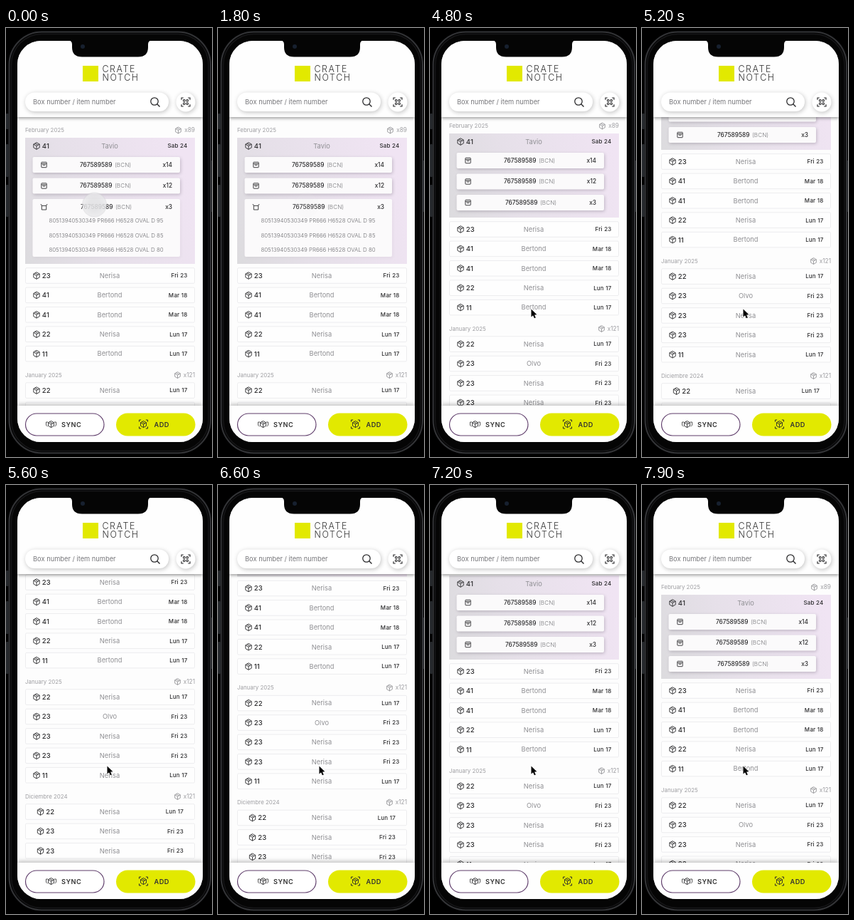
Recreate the animation shown at these times as an HTML page with a canvas. Size 290x602 px, loop 8 s.

```html
<!DOCTYPE html>
<html lang="en">
<head>
<meta charset="utf-8">
<title>Box list</title>
<style>
  html, body { margin: 0; width: 100%; height: 100%; overflow: hidden; background: #000; }
  canvas { display: block; width: 290px; height: 602px; }
</style>
</head>
<body>
<canvas id="stage"></canvas>
<script>
const W = 290, H = 602, LOOP = 8000, STEP = 100;
const canvas = document.getElementById('stage');
const dpr = window.devicePixelRatio || 1;
canvas.width = W * dpr;
canvas.height = H * dpr;
const c = canvas.getContext('2d');

const INK = '#2b2b2d', GREY = '#8f8f93', LIME = '#e2e900', PLUM = '#5f3d6b';
const SCREEN = { x: 16, y: 18, w: 261, h: 563, r: 33 };
const ROW_GAP = 27.4, FOLD = 59;

const months = [
  { y: 143.5, name: 'February 2025', total: 'x89', iconX: 242.5, first: 288.5, inset: 0, rows: [
    ['23', 'Nerisa', 'Fri 23'], ['41', 'Bertond', 'Mar 18'], ['41', 'Bertond', 'Mar 18'],
    ['22', 'Nerisa', 'Lun 17'], ['11', 'Bertond', 'Lun 17']] },
  { y: 428, name: 'January 2025', total: 'x121', iconX: 241.5, first: 449.6, inset: 0, rows: [
    ['22', 'Nerisa', 'Lun 17'], ['23', 'Olvo', 'Fri 23'], ['23', 'Nerisa', 'Fri 23'],
    ['23', 'Nerisa', 'Fri 23'], ['11', 'Nerisa', 'Lun 17']] },
  { y: 589, name: 'Diciembre 2024', total: 'x121', iconX: 241.5, first: 610.5, inset: 5.5, rows: [
    ['22', 'Nerisa', 'Lun 17'], ['23', 'Nerisa', 'Fri 23'], ['23', 'Nerisa', 'Fri 23']] }
];

const scrollKeys = [[4700, 0], [4800, 6], [5000, 50], [5200, 101], [5400, 137], [5600, 152],
  [6300, 152], [6400, 151], [6600, 143.5], [6800, 108], [7000, 66], [7200, 27], [7400, 5], [7500, 0]];
const foldKeys = [[3600, 1], [3700, 0.55], [3800, 0.15], [3900, 0]];
const touchKeys = [[600, 1], [1000, 0.12], [3600, 0.12], [3900, 0]];

function track(keys, t) {
  if (t <= keys[0][0]) return keys[0][1];
  for (let i = 1; i < keys.length; i++) {
    const [t0, v0] = keys[i - 1], [t1, v1] = keys[i];
    if (t <= t1) return v0 + (v1 - v0) * (t - t0) / (t1 - t0);
  }
  return keys[keys.length - 1][1];
}

function text(str, x, y, size, weight, color, align = 'left', spacing = 0) {
  c.font = `${weight} ${size}px Inter, sans-serif`;
  c.letterSpacing = spacing + 'px';
  c.textAlign = align;
  c.fillStyle = color;
  c.fillText(str, x, y + size * 0.36);
}

function box(x, y, w, h, r, fill, stroke, line = 1) {
  c.beginPath();
  c.roundRect(x, y, w, h, r);
  if (fill) { c.fillStyle = fill; c.fill(); }
  if (stroke) { c.strokeStyle = stroke; c.lineWidth = line; c.stroke(); }
}

function shadow(color, blur, dx, dy, draw) {
  c.save();
  c.shadowColor = color;
  c.shadowBlur = blur * dpr;
  c.shadowOffsetX = dx * dpr;
  c.shadowOffsetY = dy * dpr;
  draw();
  c.restore();
}

function lines(color, width, ...paths) {
  c.strokeStyle = color;
  c.lineWidth = width;
  c.beginPath();
  for (const p of paths) {
    c.moveTo(p[0], p[1]);
    for (let i = 2; i < p.length; i += 2) c.lineTo(p[i], p[i + 1]);
  }
  c.stroke();
}

function cube(x, y, r, color, width = 0.9) {
  const a = r * 0.87, b = r / 2;
  lines(color, width,
    [x, y - r, x + a, y - b, x + a, y + b, x, y + r, x - a, y + b, x - a, y - b, x, y - r],
    [x - a, y - b, x, y, x + a, y - b], [x, y, x, y + r],
    [x - a / 2, y - r * 0.75, x + a / 2, y - r * 0.25]);
}

function corners(x, y, r, len, color, width) {
  for (const sx of [-1, 1]) for (const sy of [-1, 1]) {
    const ex = x + sx * r, ey = y + sy * r;
    lines(color, width, [ex - sx * len, ey, ex, ey, ex, ey - sy * len]);
  }
}

function boxIcon(x, y, open) {
  if (open) {
    lines(INK, 0.9, [x - 3.2, y - 2, x - 3.2, y + 4, x + 3.2, y + 4, x + 3.2, y - 2],
      [x - 4.6, y - 4, x - 3, y - 1.6, x + 3, y - 1.6, x + 4.6, y - 4]);
  } else {
    box(x - 3.7, y - 3.7, 7.4, 7.4, 0.6, null, INK, 0.9);
    lines(INK, 0.8, [x - 3.7, y - 1.6, x + 3.7, y - 1.6], [x - 1.3, y - 1.6, x - 1.3, y + 0.6, x + 1.3, y + 0.6, x + 1.3, y - 1.6]);
  }
}

function entry(y, [count, who, day], inset = 0) {
  cube(43 + inset, y, 4.8, INK);
  text(count, 50.7 + inset, y, 9.5, 500, INK, 'left', 0.2);
  text(who, 146, y, 9.3, 400, GREY, 'center');
  text(day, 255.5 - inset, y, 8, 500, INK, 'right', 0.2);
}

function item(y, count, textX, open) {
  const h = 22 + FOLD * open;
  const depth = 0.26 - 0.2 * open;
  shadow(`rgba(60,50,70,${depth})`, 4, 1, 1.5, () => box(37.5, y - 11, 207.5, h, 2, '#fbfafb'));
  boxIcon(53.5, y, open > 0.5);
  text('767589589', textX, y, 8.3, 500, INK);
  text('(BCN)', textX + 49, y, 8.2, 300, '#77777b');
  text(count, 234, y, 8.3, 500, INK, 'right');
  if (!open) return;
  c.save();
  c.beginPath();
  c.rect(37, y - 11, 208, h);
  c.clip();
  ['95', '85', '80'].forEach((n, i) =>
    text('80513940530349 PR666 H6528 OVAL D ' + n, 141, y + 19.5 + 20.2 * i, 7.9, 300, '#6d6d71', 'center'));
  c.restore();
}

function panel(open) {
  const h = 118 + FOLD * open;
  const g = c.createLinearGradient(27, 154 + h, 266, 154 + h * 0.45);
  g.addColorStop(0, '#dcdbde');
  g.addColorStop(0.4, '#e6e0e9');
  g.addColorStop(1, '#f0e4f3');
  c.fillStyle = g;
  c.fillRect(27, 154, 239, h);
  entry(165.5, ['41', 'Tavio', 'Sab 24']);
  item(192, 'x14', 104, 0);
  item(221.5, 'x12', 104, 0);
  item(251, 'x3', 106 - open, open);
}

function list(scroll, open) {
  c.save();
  c.beginPath();
  c.rect(SCREEN.x, 125, SCREEN.w, 406);
  c.clip();
  c.translate(0, -scroll);
  panel(open);
  months.forEach((m, i) => {
    const push = FOLD * open, y = m.y + (i ? push : 0);
    text(m.name, 27, y, 7.9, 400, '#9e9ea2');
    cube(m.iconX, y, 4.4, '#88888c', 0.8);
    text(m.total, 266, y, 8.3, 400, '#9e9ea2', 'right');
    m.rows.forEach((r, j) => {
      const ry = m.first + push + j * ROW_GAP;
      box(27.5, ry - 10.8, 238, 21.6, 1.5, '#fefefe', '#ebebee', 0.9);
      entry(ry, r, m.inset);
    });
  });
  c.restore();
}

function header() {
  shadow('rgba(0,0,0,.36)', 4, 0, 1.5, () => { c.fillStyle = '#fefefe'; c.fillRect(SCREEN.x, 18, SCREEN.w, 107); });
  c.fillStyle = LIME;
  c.fillRect(108, 53, 22, 22);
  text('CRATE', 135.5, 57.5, 12.4, 300, '#333', 'left', 1.6);
  text('NOTCH', 135.5, 69.5, 12.4, 300, '#333', 'left', 1.6);

  shadow('rgba(0,0,0,.24)', 6, 1, 1.5, () => box(27, 90.5, 202, 26.5, 13.2, '#fff'));
  text('Box number / item number', 38, 104, 9.3, 400, '#77777b');
  c.beginPath();
  c.arc(209, 103, 5.2, 0, Math.PI * 2);
  c.strokeStyle = INK;
  c.lineWidth = 1.3;
  c.stroke();
  lines(INK, 1.4, [212.8, 106.8, 216.5, 110.5]);

  shadow('rgba(0,0,0,.24)', 6, 1, 1.5, () => box(239.5, 90.5, 27, 27, 13.5, '#fff'));
  corners(253, 104, 6, 2.8, INK, 1.2);
  for (const dx of [-2.2, 2.2]) for (const dy of [-2.2, 2.2])
    box(253 + dx - 1.2, 104 + dy - 1.2, 2.4, 2.4, 0, null, INK, 1);
}

function footer() {
  shadow('rgba(0,0,0,.25)', 6, 0, -2, () => { c.fillStyle = '#fefefe'; c.fillRect(SCREEN.x, 530, SCREEN.w, 52); });
  box(27.5, 541, 110.5, 31, 15.5, '#fff', PLUM, 1.15);
  cube(63.5, 556, 4.6, INK);
  lines(INK, 0.8, [59, 553, 56.5, 553, 56.5, 557.5, 58.5, 559], [68, 553, 70.5, 553, 70.5, 557.5, 68.5, 559]);
  text('SYNC', 78, 556.3, 9.2, 600, '#333', 'left', 0.5);
  box(155, 540.5, 111.5, 32, 16, LIME);
  cube(193.5, 556, 4.6, INK);
  corners(193.5, 556, 6, 2.6, INK, 1);
  text('ADD', 208.5, 556.3, 9.2, 600, '#333', 'left', 0.5);
}

function phone() {
  c.fillStyle = '#000';
  c.fillRect(0, 0, W, H);
  for (const [x, y, h] of [[0, 120, 22], [0, 163, 46], [0, 220, 45], [287, 186, 72]])
    box(x, y, 3.5, h, 1, '#26292d');
  box(4.5, 5.5, 283.5, 591, 46, '#050505', '#333437', 2);
  box(7.5, 8.5, 277.5, 585, 43, null, '#161618', 1.5);
}

function notch() {
  c.fillStyle = '#050505';
  c.beginPath();
  c.moveTo(88, 17);
  c.quadraticCurveTo(93, 18, 93, 23);
  c.lineTo(93, 27);
  c.quadraticCurveTo(93, 40.5, 107, 40.5);
  c.lineTo(186, 40.5);
  c.quadraticCurveTo(200, 40.5, 200, 27);
  c.lineTo(200, 23);
  c.quadraticCurveTo(200, 18, 205, 17);
  c.fill();
  c.beginPath();
  c.arc(108, 26, 3, 0, Math.PI * 2);
  c.fillStyle = '#17202f';
  c.fill();
}

function touch(alpha) {
  if (!alpha) return;
  c.save();
  c.globalAlpha = alpha;
  const g = c.createRadialGradient(124.5, 248, 8, 124.5, 248, 17.5);
  g.addColorStop(0, 'rgba(226,226,228,.88)');
  g.addColorStop(0.8, 'rgba(232,232,234,.8)');
  g.addColorStop(1, 'rgba(205,205,208,.4)');
  c.fillStyle = g;
  c.beginPath();
  c.arc(124.5, 248, 17.5, 0, Math.PI * 2);
  c.fill();
  c.restore();
}

function arrow(t) {
  if (t < 4300) return;
  const p = Math.min(1, (t - 4200) / 500), e = p * p * (3 - 2 * p);
  c.save();
  c.translate(124.5 + 18 * e, 248 + 146.5 * e);
  c.scale(0.88, 0.88);
  c.beginPath();
  c.moveTo(0, 0);
  for (const [x, y] of [[0, 12.5], [2.9, 9.9], [5, 14.5], [7.2, 13.5], [5.2, 9], [9, 8.8]]) c.lineTo(x, y);
  c.closePath();
  c.fillStyle = '#000';
  c.strokeStyle = '#fff';
  c.lineWidth = 1.6;
  c.lineJoin = 'round';
  c.stroke();
  c.fill();
  c.restore();
}

function draw(t) {
  c.setTransform(dpr, 0, 0, dpr, 0, 0);
  phone();
  c.save();
  c.beginPath();
  c.roundRect(SCREEN.x, SCREEN.y, SCREEN.w, SCREEN.h, SCREEN.r);
  c.clip();
  c.fillStyle = '#fdfdfd';
  c.fillRect(SCREEN.x, SCREEN.y, SCREEN.w, SCREEN.h);
  list(track(scrollKeys, t), track(foldKeys, t));
  header();
  footer();
  c.restore();
  notch();
  touch(track(touchKeys, t));
  arrow(t);
}

const start = performance.now();
function tick() {
  const t = (performance.now() - start) % LOOP;
  draw(Math.floor(t / STEP) * STEP);
  requestAnimationFrame(tick);
}
tick();
</script>
</body>
</html>
```
